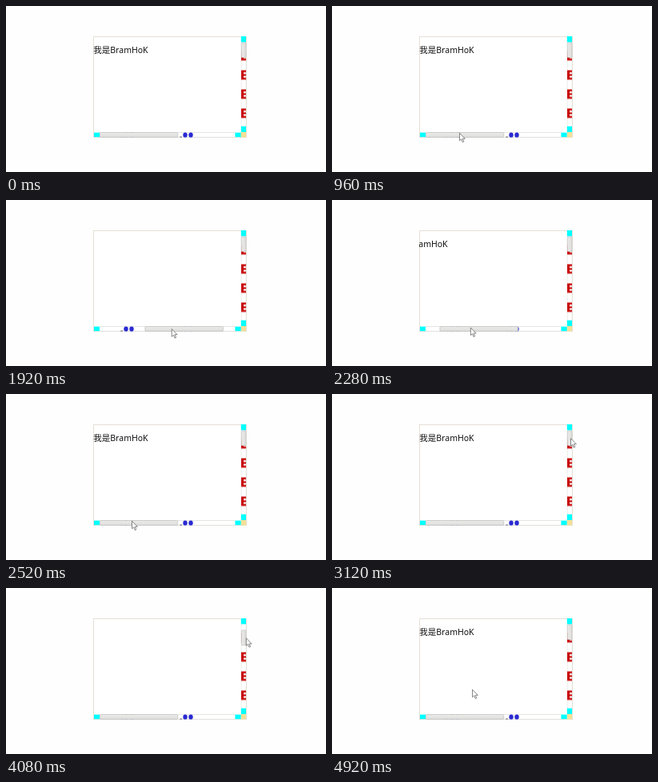
An HTML page that plays this animation: 400 by 208 pixels, repeating every 5.64 s.

```html
<!DOCTYPE html>
<html lang="zh">
<head>
<meta charset="utf-8">
<title>Custom scrollbars</title>
<style>
  html, body { margin: 0; width: 100%; height: 100%; overflow: hidden; background: #fefefe; }
  svg { display: block; width: 100vw; height: 100vh; }
  text { font: 10.5px "Noto Sans", "Noto Sans CJK SC", "Noto Sans CJK", sans-serif; fill: #111; }
  .button { fill: #0ff; }
  .thumb { stroke: #c2c2c0; stroke-width: .8; }
  .groove { fill: #fff; stroke: #dadad6; stroke-width: .7; }
</style>
</head>
<body>
<svg viewBox="0 0 400 208">
  <defs>
    <clipPath id="view"><rect x="109" y="39" width="184" height="119"/></clipPath>
    <clipPath id="trackX"><rect x="117" y="158" width="169.5" height="7"/></clipPath>
    <clipPath id="trackY"><rect x="293.5" y="45" width="7" height="106"/></clipPath>
    <linearGradient id="shadeX" x2="0" y2="1">
      <stop stop-color="#ececea"/><stop offset="1" stop-color="#dcdcda"/>
    </linearGradient>
    <linearGradient id="shadeY">
      <stop stop-color="#ececea"/><stop offset="1" stop-color="#dcdcda"/>
    </linearGradient>
    <pattern id="dots" x="143" y="158" width="74" height="8" patternUnits="userSpaceOnUse">
      <g fill="#2a2ad2">
        <ellipse cx="7" cy="3.7" rx="2.7" ry="3.1"/>
        <ellipse cx="14" cy="3.7" rx="2.7" ry="3.1"/>
      </g>
      <path d="M.3 6.1h2.6" stroke="#334" stroke-width=".9"/>
    </pattern>
    <pattern id="letters" x="294" y="56.5" width="8" height="24" patternUnits="userSpaceOnUse">
      <path d="M0 0h7v2.5h-4v2.2h4v2.4h-4v2.2h4v2.5h-7z" fill="#c80808"/>
    </pattern>
  </defs>

  <rect x="109.5" y="38.5" width="191" height="126" fill="#fff" stroke="#e6dfd5"/>
  <g clip-path="url(#view)"><text id="content" x="109.3" y="59">我是BramHoK</text></g>

  <g clip-path="url(#trackX)">
    <rect class="groove" x="116" y="158.5" width="172" height="6"/>
    <rect x="117" y="158" width="170" height="6.8" fill="url(#dots)"/>
    <rect id="thumbX" class="thumb" x="117.3" y="158.6" width="97.4" height="5.9" rx="1" fill="url(#shadeX)"/>
  </g>
  <g clip-path="url(#trackY)">
    <rect class="groove" x="294" y="44" width="6.2" height="108"/>
    <rect x="294" y="56" width="6" height="95" fill="url(#letters)"/>
    <rect id="thumbY" class="thumb" x="294.2" y="45.9" width="5.9" height="18.6" rx="1" fill="url(#shadeY)"/>
  </g>

  <rect class="button" x="110" y="158.6" width="7" height="5.6"/>
  <rect class="button" x="286.4" y="158.6" width="7.4" height="5.6"/>
  <rect class="button" x="293.8" y="38" width="6.2" height="7.3"/>
  <rect class="button" x="293.8" y="150.7" width="6.2" height="7.3"/>
  <rect x="293.8" y="158" width="6.2" height="6.4" fill="#f3e196"/>

  <path id="cursor" d="M.5 1.2V10.8L2.7 8.8L4.2 12.6L5.8 11.9L4.2 8.3H7.3Z"
        fill="#fff" stroke="#555" stroke-width=".7" stroke-linejoin="round"/>
</svg>
<script>
  const LOOP = 5640, STEP = 120;
  const entry = { x: 84, y: 110 };
  // The pointer rests between legs.
  const legs = [
    { from: 120, to: 600, x: 159, y: 152 },
    { from: 600, to: 960, x: 159, y: 158 },
    { from: 1080, to: 1200, x: 195, y: 160 },
    { from: 1440, to: 1680, x: 219.5, y: 161 },
    { from: 1800, to: 2520, x: 157, y: 158 },
    { from: 2520, to: 3000, x: 298, y: 54.5 },
    { from: 3240, to: 3480, x: 299, y: 113 },
    { from: 3480, to: 4320, x: 300, y: 48 },
    { from: 4440, to: 4920, x: 175, y: 126 }
  ];
  const [content, thumbX, thumbY, cursor] =
    ["content", "thumbX", "thumbY", "cursor"].map(id => document.getElementById(id));
  const clamp = (v, min, max) => Math.min(max, Math.max(min, v));
  const easeOut = k => 1 - (1 - k) ** 1.25;
  const move = (node, x, y) => node.setAttribute("transform", `translate(${x} ${y})`);

  function pointerAt(time) {
    return legs.reduce((p, leg) => {
      const k = easeOut(clamp((time - leg.from) / (leg.to - leg.from), 0, 1));
      return { x: p.x + (leg.x - p.x) * k, y: p.y + (leg.y - p.y) * k };
    }, entry);
  }

  const start = performance.now();
  function draw() {
    const elapsed = Math.max(0, performance.now() - start) % LOOP;
    const time = Math.floor(elapsed / STEP) * STEP;
    const { x, y } = pointerAt(time);
    const dragX = time > 1080 && time < 2520 ? clamp((x - 157.5) * 1.15, 0, 71) : 0;
    const dragY = time > 3240 && time < 4320 ? clamp(y - 54.5, 0, 86) : 0;

    cursor.style.visibility = time < STEP ? "hidden" : "visible";
    move(cursor, x, y);
    move(thumbX, dragX, 0);
    move(thumbY, 0, dragY);
    move(content, -dragX * 1.87, -dragY * 6.3);
    requestAnimationFrame(draw);
  }
  draw();
</script>
</body>
</html>
```
